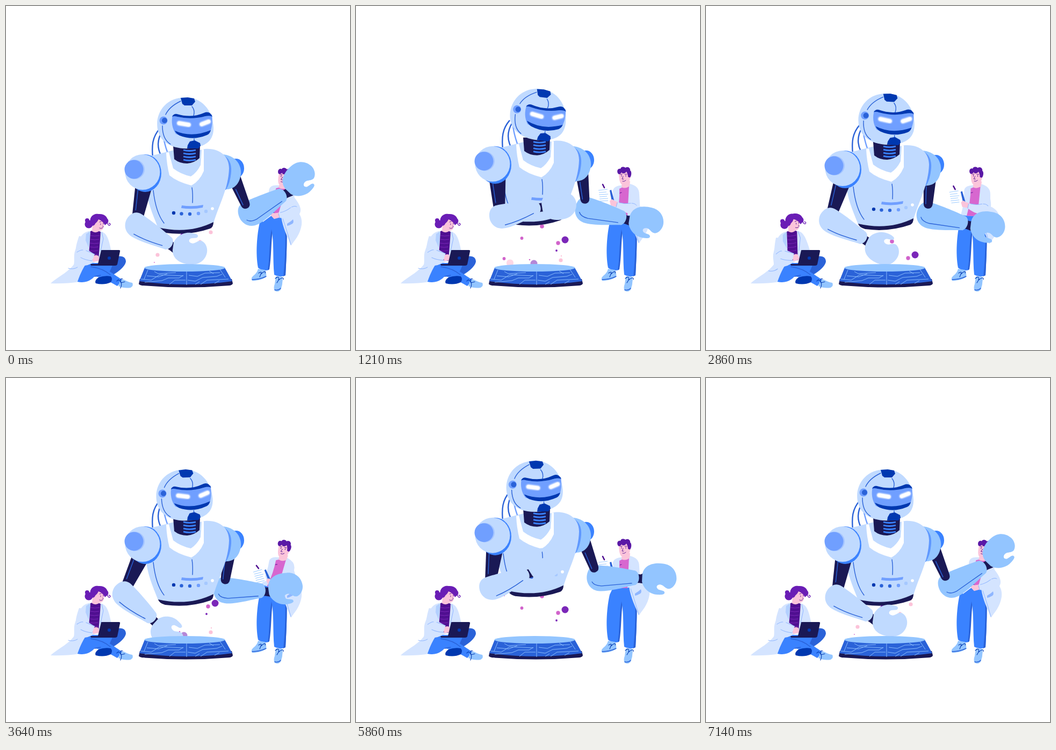
Write an HTML page that moves like this. It is 640 px wide and 640 px high and loops after 7210 ms.

```html
<!DOCTYPE html>
<html lang="en">
<head>
<meta charset="utf-8">
<title>Robot workshop</title>
<style>
  html, body { margin: 0; height: 100%; overflow: hidden; background: #fff; }
  svg { display: block; width: 100vw; height: 100vh; }
  .light { fill: #c0daff; } .sky { fill: #93c5ff; } .mid { fill: #709fff; }
  .blue { fill: #3a82ff; } .deep { fill: #2a62d8; } .royal { fill: #0038b0; }
  .navy { fill: #1a1955; } .coat { fill: #d4e4ff; } .skin { fill: #fbc4da; }
  .hair { fill: #6a1db5; } .plum { fill: #4f0f90; } .rose { fill: #d767cf; } .white { fill: #fff; }
  .line { fill: none; stroke: #2a62d8; stroke-width: 1.4; stroke-linecap: round; stroke-linejoin: round; }
  .thin { fill: none; stroke: #93c5ff; stroke-width: .9; stroke-linejoin: round; }
  .face { fill: none; stroke: #4f0f90; stroke-width: .9; stroke-linecap: round; }
  .fold { fill: none; stroke: #8fb6ff; stroke-width: 1; stroke-linecap: round; }
  .lace { fill: none; stroke: #0038b0; stroke-width: 1.1; stroke-linecap: round; }
</style>
</head>
<body>
<svg viewBox="0 0 640 640">
  <defs>
    <path id="forearm" d="M-2-20C20-20 56-15 68-13C78-12 81 6 71 12C56 15 25 25 6 25C-14 25-20 10-20 2C-20-10-14-20-2-20Z"/>
    <path id="hand" d="M2-6C4-16 15-29 32-29C40-29 46-28 45-24C44-20 38-21 33-19C28-16 29-10 37-10C44-11 45-17 53-17C61-15 66-6 66 2C66 16 56 28 40 29C22 31 4 25 2 7Z"/>
    <path id="wrist" d="M64-8L80-7L86-10L88 10L78 9L66 9Z"/>
    <filter id="glow" x="-50%" y="-80%" width="200%" height="260%"><feGaussianBlur stdDeviation="1.2"/></filter>
  </defs>

  <g id="particles"></g>

  <!-- man -->
  <g id="man">
    <path class="blue" d="M480 386H508L494 425C490 450 492 475 489 491Q478 494 469 487C464 460 467 425 472 403Z"/>
    <path class="deep" d="M494 415C489 445 491 470 487 491L490 490C494 465 493 440 496 420Z"/>
    <path class="blue" d="M494 388H521C524 425 522 465 520 501Q510 506 499 500C496 470 499 440 494 416Z"/>
    <path class="deep" d="M518 390H521C524 425 522 465 520 501L516 503C520 465 521 425 518 390Z"/>
    <path class="sky" d="M469 489L482 491Q486 500 483 505Q470 512 458 511Q455 506 460 502Q467 497 469 489Z"/>
    <path class="sky" d="M502 503L514 504Q516 516 511 528Q506 533 500 530Q497 525 500 517Z"/>
    <path class="line" d="M458 509Q472 509 484 503M500 528Q507 530 511 525"/>
    <path class="lace" d="M470 497Q477 492 474 499Q484 490 482 497M474 499L472 504M501 507Q509 500 507 510Q517 502 516 509M507 510L504 515"/>
    <g id="skirt">
      <path class="coat" d="M512 345L527 372C540 376 548 388 546 403C543 422 533 432 526 442C520 425 511 410 508 388Z"/>
      <path fill="#8fb6ff" d="M519 401Q526 397 530 393Q532 398 529 401Q524 404 519 405Z"/>
      <path class="fold" d="M511 392Q518 412 526 440"/>
    </g>
    <g id="manTop">
      <path class="coat" d="M478 345Q478 336 491 334L510 331Q527 335 527 350L529 384Q505 394 474 390Q480 365 478 345Z"/>
      <path class="rose" d="M490 340L498 336L508 334L505 391H485Q491 365 490 340Z"/>
      <path class="skin" d="M495 326H510L509 335Q501 341 494 337Z"/>
      <path class="skin" d="M489 310Q489 326 493 331Q500 336 508 328L511 317L507 306H492Z"/>
      <path class="hair" style="fill:#5a18a6" d="M489 313C484 310 486 301 492 303C493 298 500 299 501 301C507 297 511 303 510 306C514 308 512 319 509 319L506 318C506 314 505 311 503 308C499 314 494 311 494 309Q493 313 489 313Z"/>
      <path class="face" d="M494 315V317M502 315V317M492 313.500L495 313M500 313L504 313M497 317L495 322L498 322M496 326Q500 327 502 324M491 348L494 347"/>
      <g id="manArm">
        <path class="white" d="M451 341L469 339L473 363L453 366Z"/>
        <path class="thin" d="M451 343L468 341M452 347L466 346M452 351L469 350M453 355L467 354M453 359L469 358M454 363L469 362"/>
        <path class="deep" d="M472 343L475 342L480 361L476 364Z"/>
        <path d="M459 332L462 338" stroke="#4f0f90" stroke-width="2.6" stroke-linecap="round"/>
        <path class="skin" d="M472 363Q476 357 480 362L488 365L486 374L474 371Z"/>
        <path class="coat" d="M513 345Q526 341 527 360Q530 382 518 386Q500 388 484 374L487 365Q500 369 511 367Z"/>
        <path class="fold" d="M486 366L484 374M513 367Q519 367 522 371M511 367Q500 369 490 366"/>
      </g>
    </g>
  </g>

  <!-- robot -->
  <g id="robot">
    <g id="foreR"><use href="#wrist" class="navy"/><use href="#forearm" class="sky" transform="scale(1 1.07)"/><path class="line" d="M-10 10Q-6 17 8 17L64 10"/></g>
    <g id="handR"><use href="#hand" class="sky" transform="scale(1 -1)"/></g>
    <g id="upR"><path class="navy" d="M-10 12H15L9 70Q8 79 0 79Q-8 78-8 70Z"/><path class="line" d="M-4 38L-4 70"/></g>
    <ellipse class="blue" cx="428" cy="302" rx="15" ry="18"/>
    <path class="sky" d="M403 276C425 278 438 293 437 312C435 330 425 342 408 341Z"/>
    <path fill="#5f98ff" d="M403 277C415 282 420 294 419 308C418 322 414 335 409 342H400Z"/>
    <g fill="none" stroke-width="2.4">
      <path stroke="#2a62d8" d="M286 228C272 244 271 260 273 282M291 232C280 250 282 265 288 277"/>
      <path stroke="#709fff" d="M292 238Q294 255 301 274"/>
    </g>
    <path class="light" d="M265 280L301 271L313 268H361L370 266C398 264 415 280 415 302C414 340 396 370 386 404Q340 425 283 413C272 385 263 365 260 335Z"/>
    <path class="navy" d="M283 412Q340 425 386 402Q386 411 380 414Q340 428 296 422Q285 419 283 412Z"/>
    <path class="white" d="M298 273L303 272L311 302Q325 313 344 317Q355 310 362 296L364 267H368V307Q360 326 345 334Q318 327 304 315Q299 295 298 273Z"/>
    <path class="navy" d="M311 260H361L360 283Q350 292 337 293Q323 293 313 285Z"/>
    <path d="M330 268Q341 271 353 268M330 274Q341 277 353 274M330 280Q341 283 353 280M330 286Q341 289 353 286" fill="none" stroke="#3a82ff" stroke-width="2.8"/>
    <path class="line" d="M346 338Q348 350 347 366M274 343C277 370 283 390 294 404"/>
    <path class="mid" d="M327 371Q347 374 367 370L366 375Q347 379 326 376Z"/>
    <g id="buttons"></g>
    <g id="upL"><path class="navy" d="M-12 22H20L11 84H-10Z"/><path class="line" d="M-6 34L-5 72"/></g>
    <ellipse class="blue" cx="259" cy="311" rx="30" ry="35"/>
    <ellipse class="light" cx="254" cy="309" rx="32.500" ry="33"/>
    <circle cx="240" cy="304" r="18" fill="#a5c5ff"/>
    <circle class="mid" cx="238" cy="304" r="17.500"/>
    <g id="foreL"><use href="#wrist" class="navy"/><use href="#forearm" class="light"/><path class="line" d="M6 19Q30 18 62 9"/></g>
    <g id="handL"><use href="#hand" class="light"/></g>
    <g id="head">
      <path class="light" d="M334 170C363 170 385 193 386 226C387 250 372 260 350 264C325 268 301 262 289 246C270 218 286 170 334 170Z"/>
      <path class="line" d="M325 177Q304 187 297 202M291 223C291 240 296 251 306 257M346 187Q352 194 349 204M350 247V252"/>
      <path class="royal" d="M325 171L338 170L350 172L352 178L346 185H332L328 182Z"/>
      <circle class="mid" cx="293" cy="213" r="7.500"/><circle class="deep" cx="295" cy="213" r="5"/>
      <path class="mid" d="M310 203C330 211 360 209 383 202C385 215 383 229 379 236C355 246 335 246 316 238C309 228 307 215 310 203Z"/>
      <path class="royal" d="M309 206Q312 200 318 201Q345 209 368 199Q379 194 384 206Q380 203 371 205Q345 212 319 206Q313 204 309 206Z"/>
      <path class="royal" d="M314 232Q345 246 381 231Q379 238 374 240Q348 251 323 241Q317 238 314 232Z"/>
      <g fill="none" stroke="#fff" stroke-linecap="round">
        <path filter="url(#glow)" stroke-width="8.500" d="M322 218L340 221M364 220L377 215"/>
        <path stroke-width="5.500" d="M322 218L340 221M364 220L377 215"/>
      </g>
      <path class="royal" d="M338 259L342 252L351 250L361 255L362 260L358 265H337Z"/>
    </g>
  </g>

  <!-- platform -->
  <path class="navy" d="M249 508L247 517Q248 519 253 520Q335 527 416 520Q421 519 422 516L420 508Z"/>
  <path class="deep" d="M258 487L248 512Q335 524 421 512L407 487Z"/>
  <path class="thin" d="M336 494V519M264 491L257 508M251 508L270 510L286 500L330 502M262 502L284 504L300 498M258 514L290 511L302 506H322L330 501M304 518L314 510H334M276 494L283 498L316 496M340 501L356 503L370 497L398 496M338 510L352 512L366 505L392 503L402 499M362 518L374 510L414 508M352 518L360 513M378 493L386 498M398 490L408 505M388 516L397 511"/>
  <ellipse class="sky" cx="332.500" cy="487" rx="75" ry="7"/>

  <!-- woman -->
  <g id="woman">
    <path class="coat" d="M127 480C114 497 96 504 83 516Q112 517 136 513L158 480Z"/>
    <path class="deep" d="M164 498L206 466Q223 463 223 476Q220 490 187 507Z"/>
    <path class="blue" d="M150 478Q175 478 190 492L217 510L207 521Q180 505 165 503Q152 517 133 513Q140 492 150 478Z"/>
    <path class="blue" d="M150 478H200L193 494Z"/>
    <path class="line" d="M158 485Q180 488 194 500M165 503L176 501"/>
    <path class="royal" d="M172 505Q184 501 195 503Q199 508 195 514Q182 520 167 516Q164 511 172 505Z"/>
    <path class="sky" d="M212 511L219 509Q228 514 235 515Q238 520 232 524Q220 526 209 521Z"/>
    <path class="lace" d="M206 512Q210 506 214 515Q212 505 217 508M214 515Q216 518 213 525M214 515L221 513"/>
    <g id="womanTop">
      <path class="coat" d="M154 419C138 422 135 438 129 454C124 466 130 476 124 487L152 482L190 466L196 456C192 438 189 423 178 420Z"/>
      <path class="plum" d="M157 419Q167 415 176 420C175 440 173 458 172 474L153 472Q156 445 157 419Z"/>
      <path d="M157 427Q165 429 174 427M157 434Q165 436 173 434M156 441Q164 443 173 441M155 448Q164 450 172 448M155 455Q163 457 171 455M154 462Q163 464 171 462" stroke="#7b27b8" fill="none"/>
      <path fill="#b3d0ff" d="M157 419L149 424L148 436L154 450L155 436Z"/>
      <path class="fold" d="M178 421L181 433L176 456M143 440Q139 452 146 457M116 488Q125 491 133 486"/>
      <circle class="hair" cx="154" cy="406" r="7.500"/><circle class="hair" cx="151" cy="399" r="4"/>
      <circle class="hair" cx="185" cy="400" r="5.500"/>
      <path class="skin" d="M161 408H173L174 418Q168 424 160 419Z"/>
      <path class="skin" d="M164 395Q182 392 182 404Q183 416 176 418Q165 419 162 409Z"/>
      <path class="hair" d="M157 404C154 392 164 385 172 387C184 386 191 394 189 403L184 408C182 402 175 398 172 397C169 404 167 402 165 407L162 409Z"/>
      <path d="M188 402Q190 409 193 408Q196 405 191 404" stroke="#6a1db5" stroke-width="1.300" fill="none"/>
      <path class="face" d="M176 405V407M181 404V406M174 402L177 401M180 409L181 411M174 413Q178 415 180 412"/>
      <g id="womanArm">
        <path class="skin" d="M160 467Q167 461 172 465L174 474L162 476Z"/>
        <path class="coat" d="M136 428Q148 428 149 452L165 462L160 475Q140 472 130 460Q128 450 136 428Z"/>
        <path class="fold" d="M165 462Q158 459 149 455M160 474Q148 473 139 468M132 458Q140 453 143 454"/>
      </g>
    </g>
    <path class="navy" d="M177 455Q176 454 180 454H210Q213 454 212 457L207 481Q206 483 203 483H159Q156 482 158 480L171 480Z"/>
    <circle class="royal" cx="192" cy="469" r="3"/>
  </g>
</svg>

<script>
const LOOP = 7210, STEPS = 101;
const $ = id => document.getElementById(id);
const place = (id, transform) => $(id).setAttribute('transform', transform);
const clamp = v => Math.max(0, Math.min(1, v));

function circle(parent, attrs) {
  const node = document.createElementNS('http://www.w3.org/2000/svg', 'circle');
  for (const key in attrs) node.setAttribute(key, attrs[key]);
  return $(parent).appendChild(node);
}

// Smooth looping curve through values; it rests at every local extreme.
function curve(values, times = [0, 17, 30, 51, 64, 82, 100]) {
  const last = times.length - 1;
  const slope = i => (values[i + 1] - values[i]) / (times[i + 1] - times[i]);
  const tangents = values.map((_, i) => {
    const before = slope(i ? i - 1 : last - 1), after = slope(i < last ? i : 0);
    return before * after <= 0 ? 0 : 2 * before * after / (before + after);
  });
  return n => {
    let i = 0;
    while (i < last - 1 && n > times[i + 1]) i++;
    const span = times[i + 1] - times[i], s = (n - times[i]) / span, r = 1 - s;
    return values[i] * (1 + 2 * s) * r * r + tangents[i] * span * s * r * r
      + values[i + 1] * s * s * (3 - 2 * s) - tangents[i + 1] * span * s * s * r;
  };
}

const manTimes = [0, 13, 36, 50, 63, 87, 100];
const headTilt = curve([0, 7.3, 7, -2.4, -4, -2, 0]);
const manLean = curve([1, 0, 0, 1, 0, 0, 1], manTimes);
const manReach = curve([-42, 0, 0, -24, 0, 0, -42], manTimes);
const womanLean = curve([0, 0, 1, 1, 0, 0], [0, 21, 29, 36, 48, 100]);
const arms = [
  { side: 'L', x: 256, y: 309, upper: 97, lower: 78,
    up: curve([7.8, -7, 4, 22, 10.8, 4, 7.8]),
    fore: curve([32, -12, 12, 43, -2, -20, 32]),
    hand: curve([8, -9, 5, 42, -10, -32, 8]) },
  { side: 'R', x: 415, y: 305, upper: 88, lower: 81,
    up: curve([-25, -8.5, -4, 6, -10, -23, -25]),
    fore: curve([-28, 15, 26, 3, 8, 2, -28]),
    hand: curve([-46, 9, 20, -8, 6, 3, -46]) }
];

[[312, 385, '#0038b0'], [326.5, 386.5, '#2a62d8'], [342, 387, '#2a62d8'],
 [358, 386, '#709fff'], [372, 382, '#a5c8ff'], [384, 377, '#fff']]
  .forEach(([cx, cy, fill]) => circle('buttons', { cx, cy, fill, r: cy > 380 ? 3.2 : 2.8 }));

// x, height at the start of a burst, radius, colour
const PINK = '#fcc3d9', ROSE = '#d163cb', PURPLE = '#7b27b8';
const bursts = [-36, 0, 30, 64, 100];
const particles = [
  [282, 463, 3.6, PINK], [276, 477, 1.1, ROSE], [346, 478, 3.8, ROSE],
  [286.5, 426, 6.6, PINK], [275.5, 418, 2.9, ROSE], [331, 427, 6.5, PURPLE],
  [323, 420, 1.3, ROSE], [381, 421, 3.6, PINK], [382, 413, 1.2, PINK], [361, 438, 2.8, PINK],
  [389, 503, 6.5, PURPLE], [376, 509, 3.7, ROSE], [373, 523, 1.9, PURPLE], [308.5, 500, 2.9, ROSE]
].map(([cx, start, r, fill]) => ({ start, node: circle('particles', { cx, r, fill }) }));

function drawArm(arm, n) {
  const rad = Math.PI / 180, up = arm.up(n), fore = arm.fore(n);
  const ex = arm.x - arm.upper * Math.sin(up * rad), ey = arm.y + arm.upper * Math.cos(up * rad);
  const wx = ex + arm.lower * Math.cos(fore * rad), wy = ey + arm.lower * Math.sin(fore * rad);
  place('up' + arm.side, `translate(${arm.x} ${arm.y}) rotate(${up})`);
  place('fore' + arm.side, `translate(${ex} ${ey}) rotate(${fore})`);
  place('hand' + arm.side, `translate(${wx} ${wy}) rotate(${arm.hand(n)})`);
}

function draw(n) {
  const lift = 10 * (1 - Math.cos(2 * Math.PI * n / 50));
  place('robot', `translate(0 ${-lift})`);
  place('head', `rotate(${headTilt(n)} 340 262)`);
  arms.forEach(arm => drawArm(arm, n));

  const lean = manLean(n);
  place('manTop', `rotate(${13.5 * lean} 500 392)`);
  place('manArm', `rotate(${manReach(n)} 520 350)`);
  place('skirt', `translate(${4 * lean} ${4 * lean})`);

  place('womanTop', `rotate(${-8 * womanLean(n)} 162 485)`);
  place('womanArm', `rotate(${-3 * (1 - lean)} 140 432)`);

  particles.forEach(({ start, node }) => {
    const y = bursts.map(b => start - 4 * (n - b)).find(v => v > 370 && v < 486) ?? 486;
    node.setAttribute('cy', y);
    node.setAttribute('opacity', clamp((484 - y) / 9) * clamp((y - 370) / 30));
  });
}

const begin = performance.now();
function tick() {
  const time = (performance.now() - begin) % LOOP;
  draw(Math.min(STEPS - 1, Math.floor((time + 6) / LOOP * STEPS)));
  requestAnimationFrame(tick);
}
tick();
</script>
</body>
</html>
```
